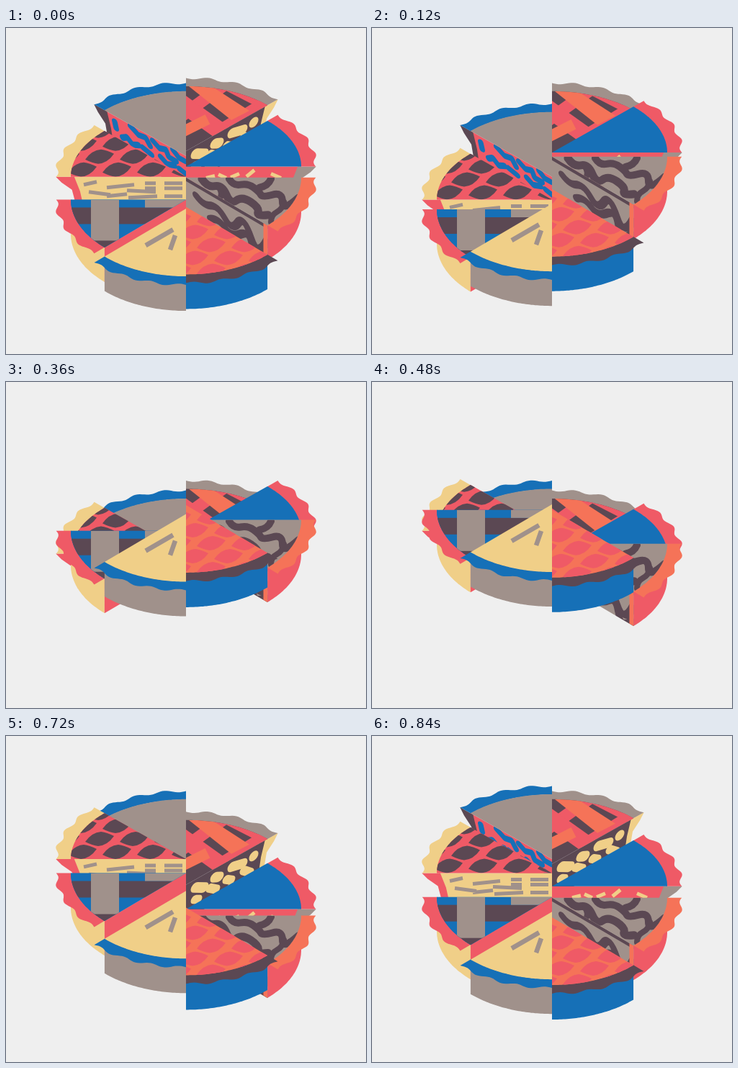
These frames come from a looping animation (500 px wide and 453 px high, 0.9 s). An HTML page:

```html
<!DOCTYPE html>
<html lang="en">
<head>
<meta charset="utf-8">
<title>Pie slices</title>
<style>
  html, body { margin: 0; width: 100%; height: 100%; overflow: hidden; background: #efefef; }
  svg { display: block; width: 500px; height: 453px; }
</style>
</head>
<body>
<svg id="stage" viewBox="0 0 500 453"></svg>
<script>
const RED = '#ef5a66', ORANGE = '#f57358', BLUE = '#1670b7';
const GRAY = '#a0918b', DARK = '#5b4853', CREAM = '#f0cf88';
const RX = 160, RY_BACK = 90, RY_FRONT = 94, DEPTH = 48, SWING = 41, LOOP = 900, STEP = 60;

const onRim = a => [RX * Math.cos(a), (Math.sin(a) < 0 ? RY_BACK : RY_FRONT) * Math.sin(a)];

// Points on the rim, scaled by k, shifted by dy, optionally fluted.
function rim(from, to, k = 1, dy = 0, flute = 0) {
  const points = [];
  for (let i = 0; i <= 48; i++) {
    const [x, y] = onRim((from + (to - from) * i / 48) * Math.PI / 180);
    const r = k - flute * Math.sin(i / 48 * Math.PI * 7);
    points.push([x * r, y * r + dy]);
  }
  return points;
}
const d = points => 'M' + points.map(p => p.map(v => v.toFixed(1))).join('L') + 'Z';
const fill = (points, color) => `<path d="${d(points)}" fill="${color}"/>`;
const line = (path, color, width, cap = 'butt') =>
  `<path d="${path}" fill="none" stroke="${color}" stroke-width="${width}" stroke-linecap="${cap}" stroke-linejoin="round"/>`;
const worm = (path, color, width) => line(path, color, width, 'round');
const rect = (x, y, w, h, color) => `<rect x="${x}" y="${y}" width="${w}" height="${h}" fill="${color}"/>`;

function leaves(x0, y0, side, color) {
  let out = '';
  for (let row = 0; row < 5; row++)
    for (let col = -2; col < 4; col++) {
      const x = x0 + side * (col * 48 + row % 2 * 24), y = y0 + side * row * 18;
      out += `<path transform="translate(${x} ${y})" fill="${color}" d="M-20 4Q-11-9 2-10Q10-9 20-4Q11 9-2 10Q-10 9-20 4Z"/>`;
    }
  return out;
}

const lattice =
  line('M-10-46L70-104M40-24L118-72', RED, 17) +
  line('M-10-69L60-19', RED, 24) +
  line('M54-93L118-60', RED, 15) +
  line('M-4-27L30-44', ORANGE, 15) +
  fill([[0, -93], [20, -100], [88, -56], [63, -43]], ORANGE);

const plaid =
  rect(-165, 0, 165, 80, BLUE) +
  rect(-165, 11, 165, 23, DARK) +
  rect(-165, 55, 165, 30, DARK) +
  rect(-57, 0, 57, 11, GRAY) +
  rect(-132, 0, 39, 57, GRAY);

const camo =
  worm('M22 2q8 12 18 10t16 12 14 8 20 2 10 14 14 4', DARK, 11) +
  worm('M60 2q6 10 16 8t18 4 10 10 16 0 14 10 22-6M118 2q-4 10-16 12', DARK, 10) +
  worm('M136 34q-2 10-10 14t-8 14M46 14q6 10 0 16', DARK, 8);

const straws = line('M-56 51L-18 29M-15 37L-22 57', GRAY, 6.5);

// Cut faces are drawn with x along the cut and y down from its top edge.
const berries = worm('M-99 8l2 8M-88 24l6-4 8 6 8-4M-77 2l11 6 10-2 6 8M-60 22l12 3M-46 5l9 5 9-3 4 8 10 0M-35 21l9 5 10-4M-18 2l8 6 8 0M-9 23l9 2', BLUE, 8);
const nuts =
  worm('M94 13h.1M64 11l15 4M40 12l6 3M13 11l12 7', CREAM, 13) +
  worm('M80 25l9 8M56 24l7 5M33 23l9 7M12 27l5 3M62 38l12 6M30 40l9 5', CREAM, 11);
const shreds = line(
  'M-142 11l18-4M-110 15l38-4M-57 9h15M-30 9h25M-30 16h25M-135 21l30 4M-82 19l40 2M-57 16h15M-110 27l28-3M-80 29l40-2M-30 27h25',
  GRAY, 5);
const zest = line('M84 14l11-9M62 15l12-5M45 11l11 5M118 10l14 6M28 16l12-3', CREAM, 5);
const marble =
  worm('M0 2L113 2', DARK, 6) +
  worm('M14 17q10 8 20 2t20 6 18-4 18 8 22-6M34 38q10-8 20 0t22-4 16 8 20 0', DARK, 10);

// Back to front. "peak" is the moment a slice is highest.
const slices = [
  { from: 225, peak: 810, crust: BLUE, top: GRAY, cut: 225, face: RED, end: DARK, filling: berries },
  { from: 270, peak: 30, crust: GRAY, top: DARK, pattern: lattice, cut: 315, face: DARK, end: CREAM, filling: nuts },
  { from: 180, peak: 690, crust: CREAM, top: RED, pattern: leaves(-48, -10, -1, DARK), cut: 180, face: CREAM, end: RED, filling: shreds },
  { from: 315, peak: 150, crust: RED, top: BLUE, cut: 360, face: RED, end: GRAY, filling: zest, drop: 2 },
  { from: 135, peak: 570, crust: RED, top: BLUE, pattern: plaid, wall: CREAM, cut: 135, face: RED },
  { from: 0, peak: 210, crust: ORANGE, top: GRAY, pattern: camo, wall: RED, cut: 45, face: GRAY, filling: marble, edge: ORANGE, drop: 1 },
  { from: 90, peak: 480, crust: BLUE, top: CREAM, pattern: straws, wall: GRAY },
  { from: 45, peak: 390, crust: DARK, top: ORANGE, pattern: leaves(35, 17, 1, RED), wall: BLUE }
];

const clipped = (id, outline, art) =>
  `<clipPath id="${id}"><path d="${d(outline)}"/></clipPath><g clip-path="url(#${id})">${art}</g>`;

function cutFace(s, id) {
  const [x, y] = onRim(s.cut * Math.PI / 180);
  const at = list => list.map(([k, h]) => [k * x, h]);
  const outline = at([[0, 0], [1, 0], [s.end ? .92 : 1, DEPTH], [0, DEPTH]]);
  let art = fill(outline, s.face);
  if (s.filling) art += clipped(id, outline, s.filling);
  if (s.edge) art += fill(at([[.95, 0], [1, 0], [1, DEPTH], [.95, DEPTH]]), s.edge);
  if (s.end) art += fill(at([[1.13, 0], [1.08, 8], [.99, 18], [.94, DEPTH], [.88, DEPTH], [.92, 20], [.97, 0]]), s.end);
  return `<g transform="matrix(1 ${y / x} 0 1 0 0)">${art}</g>`;
}

function drawSlice(s, i) {
  const to = s.from + 45, inner = rim(s.from, to);
  const top = [[0, 0], ...inner];
  let art = '';
  if (s.wall) art += fill([...inner, ...rim(to, s.from, 1, DEPTH)], s.wall);
  if (s.face) art += cutFace(s, 'face' + i);
  art += fill([...rim(s.from, to, 1.127, 0, .018), ...rim(to, s.from, .995)], s.crust);
  art += fill(top, s.top);
  if (s.pattern) art += clipped('top' + i, top, s.pattern);
  return `<g class="slice">${art}</g>`;
}

const stage = document.getElementById('stage');
stage.innerHTML = slices.map(drawSlice).join('');
const groups = stage.querySelectorAll('.slice');

function render() {
  const t = Math.floor(performance.now() % LOOP / STEP) * STEP;
  slices.forEach((s, i) => {
    const y = 211 + (s.drop || 0) - SWING * Math.cos((t - s.peak) / LOOP * 2 * Math.PI);
    groups[i].setAttribute('transform', `translate(250 ${y.toFixed(2)})`);
  });
  requestAnimationFrame(render);
}
render();
</script>
</body>
</html>
```
